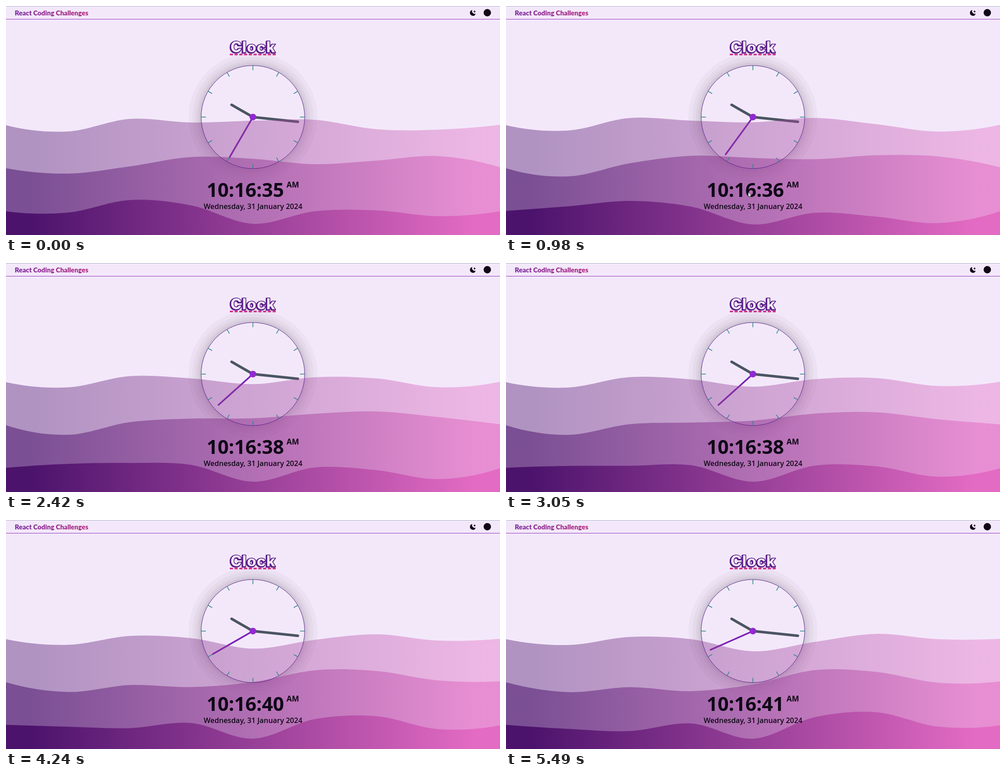
Recreate the animation shown at these times as an HTML page. Size 1097x511 px, loop 5510 ms.

```html
<!DOCTYPE html>
<html lang="en">
<head>
<meta charset="utf-8">
<title>Clock</title>
<style>
  html, body { margin: 0; width: 100%; height: 100%; overflow: hidden; background: #f3e8fa; }
  svg { display: block; width: 1097px; height: 511px; }
  .brand { font: 900 14.75px Lato, sans-serif; fill: url(#brandFill); }
  .title { font: 900 35px Inter, sans-serif; text-anchor: middle; stroke: #581c87; stroke-linejoin: round; }
  .readout { font-family: "Open Sans", "Noto Sans", sans-serif; fill: #0f0716; }
  .time { font-size: 43px; font-weight: 700; }
  .period { font-size: 17px; font-weight: 700; }
  .date { font-size: 16px; font-weight: 600; text-anchor: middle; }
</style>
</head>
<body>
<svg viewBox="0 0 1097 511">
  <defs>
    <linearGradient id="brandFill" gradientUnits="userSpaceOnUse" x1="20" x2="184">
      <stop stop-color="#7a2a9f"/><stop offset="1" stop-color="#b4257c"/>
    </linearGradient>
    <linearGradient id="waveFill" gradientUnits="userSpaceOnUse" x1="0" x2="1097">
      <stop offset=".05" stop-color="#4c136c"/><stop offset=".95" stop-color="#e36bc3"/>
    </linearGradient>
  </defs>

  <rect width="1097" height="511" fill="#f3e8fa"/>
  <g id="shadow" fill="none" stroke="#000" stroke-opacity=".033"/>
  <g stroke-linecap="round" stroke="#4b5563" stroke-width="5.8">
    <line id="hour"/>
    <line id="minute"/>
    <line id="second" stroke="#7a22b4" stroke-width="3.6"/>
  </g>
  <g id="waves" fill="url(#waveFill)"/>
  <circle id="rim" fill="none" stroke="#5b1f8a"/>
  <g id="ticks" stroke="#2b898d" stroke-width="1.6"/>
  <circle id="hub" fill="#9328d2"/>

  <rect width="1097" height="1" fill="#a9b6c3"/>
  <rect y="29" width="1097" height="1" fill="#8b30b8"/>
  <text class="brand" x="19.5" y="20.5">React Coding Challenges</text>
  <g fill="#0f0716">
    <path d="M1035.5 9A6.5 6.5 0 1 0 1043 17.2A6 6 0 0 1 1035.5 9Z"/>
    <path d="M1040.5 9.2l.9 2.2 2.2.9-2.2.9-.9 2.2-.9-2.2-2.2-.9 2.2-.9z"/>
    <circle cx="1068.8" cy="15" r="8.2"/>
  </g>

  <text class="title" x="547" y="105.2" fill="#581c87" stroke-width="2.6">Clock</text>
  <text class="title" x="548.3" y="104.4" fill="#f3e8fa" stroke-width="1.6">Clock</text>
  <path d="M497 108.2H599.5" stroke="#d02a86" stroke-width="3.5" stroke-dasharray="7 3.55"/>

  <g class="readout">
    <text id="time" class="time" x="445.5" y="426"></text>
    <text class="period" x="623" y="404.5">AM</text>
    <text class="date" x="548.5" y="453">Wednesday, 31 January 2024</text>
  </g>
  <path id="cursor" d="M538 415.5v10.5l2.4-2.2 1.7 3.7 1.7-.8-1.7-3.6h3.3z"
        fill="#fff" stroke="#222" stroke-width=".7"/>
</svg>
<script>
const LOOP = 5510, WIDTH = 1097, HEIGHT = 511;
const CENTER = { x: 548.3, y: 247.8 }, RADIUS = 115;
const FIRST_TICK = 210, START_SECOND = 35;

// Each wave morphs linearly through three poses; a pose is the crest height
// at evenly spaced points from edge to edge.
const POSE_TIMES = [0, 1400, 4900];
const WAVES = [
  { opacity: 0.4, poses: [
    [266, 280, 252, 260, 256, 254, 275, 276, 265],
    [266, 277, 249, 254, 261, 248, 259, 282, 265],
    [266, 279, 261, 266, 293, 272, 254, 266, 265]] },
  { opacity: 0.53, poses: [
    [362, 374, 358, 337, 341, 353, 345, 335, 360],
    [362, 383, 348, 333, 338, 337, 328, 336, 360],
    [362, 384, 373, 382, 367, 335, 339, 363, 360]] },
  { opacity: 1, poses: [
    [458, 461, 433, 445, 486, 458, 456, 469, 458],
    [457, 441, 436, 449, 488, 463, 476, 491, 458],
    [457, 466, 471, 454, 488, 440, 429, 461, 458]] }
];

const byId = id => document.getElementById(id);

function set(node, attrs) {
  for (const key in attrs) node.setAttribute(key, attrs[key]);
  return node;
}

function add(parentId, tag, attrs = {}) {
  const node = document.createElementNS("http://www.w3.org/2000/svg", tag);
  return byId(parentId).appendChild(set(node, attrs));
}

function setSpoke(node, degrees, from, to) {
  const a = degrees * Math.PI / 180, dx = Math.sin(a), dy = -Math.cos(a);
  set(node, {
    x1: CENTER.x + dx * from, y1: CENTER.y + dy * from,
    x2: CENTER.x + dx * to, y2: CENTER.y + dy * to
  });
}

function poseAt(poses, t) {
  const i = t < POSE_TIMES[1] ? 0 : 1;
  const u = Math.min((t - POSE_TIMES[i]) / (POSE_TIMES[i + 1] - POSE_TIMES[i]), 1);
  return poses[i].map((y, k) => y + (poses[i + 1][k] - y) * u);
}

// Smooth curve through the points, with parabolic ends.
function wavePath(ys) {
  const last = ys.length - 1, step = WIDTH / last, third = step / 3;
  const rise = ys.map((_, i) => (ys[i + 1] - ys[i - 1]) / 2);
  rise[0] = 2 * (ys[1] - ys[0]) - rise[1];
  rise[last] = 2 * (ys[last] - ys[last - 1]) - rise[last - 1];
  let d = `M0 ${HEIGHT}V${ys[0]}`;
  for (let i = 1; i <= last; i++) {
    const x = i * step;
    d += "C" + [
      x - 2 * third, ys[i - 1] + rise[i - 1] / 3,
      x - third, ys[i] - rise[i] / 3,
      x, ys[i]
    ].map(n => n.toFixed(2)).join(" ");
  }
  return d + `V${HEIGHT}Z`;
}

const circle = r => ({ cx: CENTER.x, cy: CENTER.y, r });
set(byId("rim"), circle(RADIUS));
set(byId("hub"), circle(7.4));
for (let i = 1; i <= 5; i++) {
  const spread = 3 + i * i;
  add("shadow", "circle", { ...circle(RADIUS + spread / 2), "stroke-width": spread });
}
for (let i = 0; i < 12; i++) setSpoke(add("ticks", "line"), i * 30, 104.5, RADIUS);
for (const wave of WAVES) wave.node = add("waves", "path", { "fill-opacity": wave.opacity });
setSpoke(byId("hour"), 300, 0, 54.6);
setSpoke(byId("minute"), 96, 0, 100.4);

function render(t) {
  for (const wave of WAVES) set(wave.node, { d: wavePath(poseAt(wave.poses, t)) });
  const second = START_SECOND + Math.max(0, Math.floor((t - FIRST_TICK) / 1000) + 1);
  setSpoke(byId("second"), second * 6, 0, 103);
  byId("time").textContent = `10:16:${second}`;
  byId("cursor").style.display = t >= 900 && t < 1070 ? "" : "none";
}

let start;
function frame(now) {
  start ??= now;
  render((now - start) % LOOP);
  requestAnimationFrame(frame);
}
render(0);
requestAnimationFrame(frame);
</script>
</body>
</html>
```
